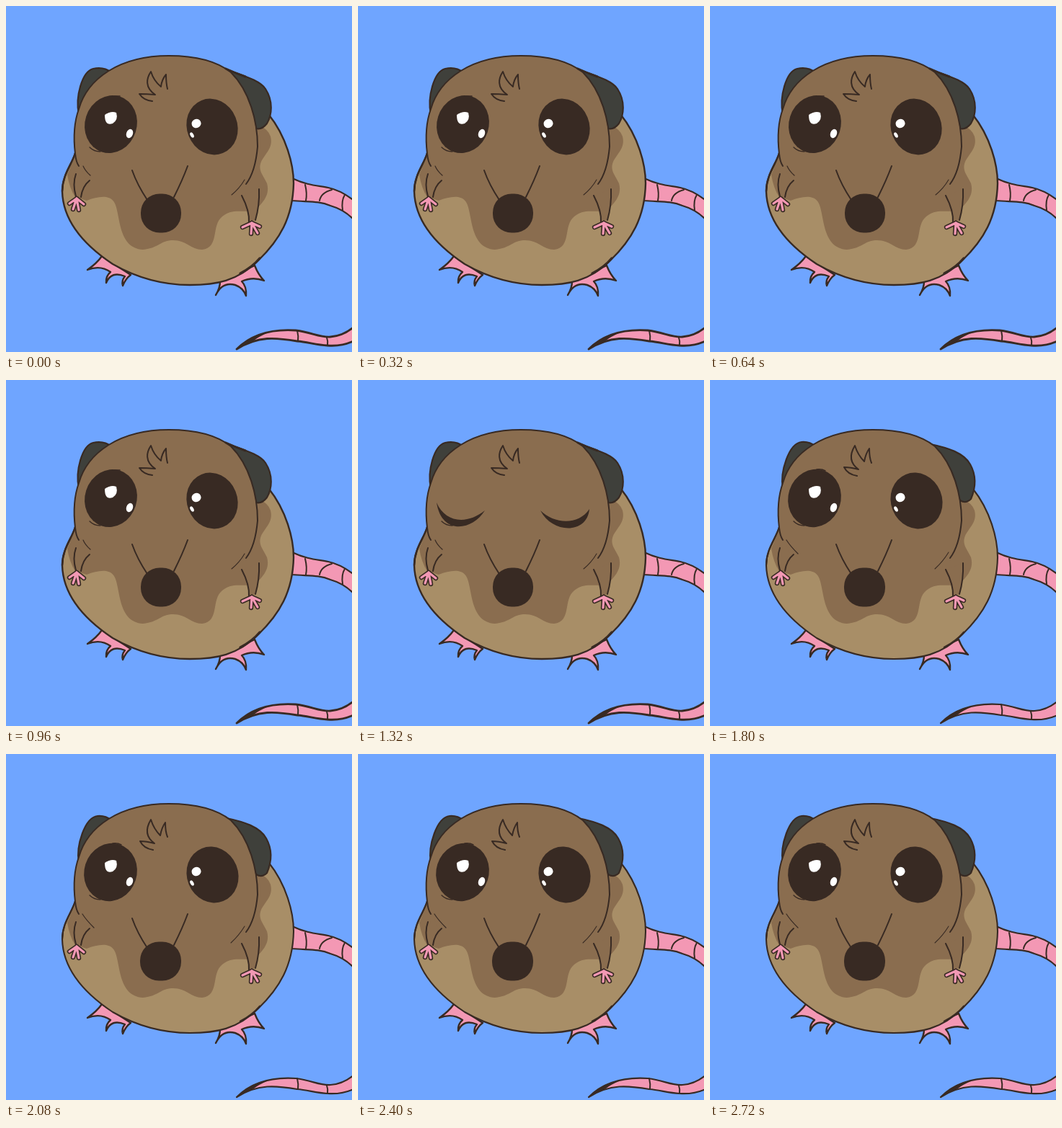
Recreate the animation shown at these times as an HTML page. Size 480 by 480 pixels, loop 2880 ms.

```html
<!DOCTYPE html>
<html lang="en">
<head>
<meta charset="utf-8">
<title>Blinking rat</title>
<style>
html, body { margin: 0; width: 100%; height: 100%; overflow: hidden; background: #6fa5ff; }
svg { display: block; width: 100vw; height: 100vh; }
</style>
</head>
<body>
<svg id="stage" viewBox="0 0 480 480" stroke-linecap="round" stroke-linejoin="round"></svg>
<script>
const INK = '#382a23', BROWN = '#8a6d4f', TAN = '#a88e67', PINK = '#f398b4', EAR = '#3f403b';
const stage = document.getElementById('stage');
const LOOP = 2880, BOIL = 160;

const line = (d, w = 2, color = INK) => `<path d="${d}" fill="none" stroke="${color}" stroke-width="${w}"/>`;
const fill = (d, color) => `<path d="${d}" fill="${color}"/>`;
const shape = (d, color, w = 2.2) => `<path d="${d}" fill="${color}" stroke="${INK}" stroke-width="${w}"/>`;
const oval = (x, y, rx, ry, color, turn = 0) =>
  `<ellipse cx="${x}" cy="${y}" rx="${rx}" ry="${ry}" fill="${color}" transform="rotate(${turn} ${x} ${y})"/>`;

// fingers spread from one point, outlined in ink
function paw(x, y, tips) {
  const d = tips.map(tip => `M${x} ${y}L${tip}`).join('');
  return line(d, 6.4, INK) + line(d, 3.2, PINK);
}

// b picks one of two slightly different drawings
function tail(b) {
  return shape('M397 239C418 249 432 249 447 252C461 255 473 262 484 271V298C474 287 464 281 450 277C434 270 418 272 397 270Z', PINK) +
    line('M415 248Q418 260 416 270M452 255Q437 259 435 270M470 262Q465 270 467 283') +
    shape('M320 476C342 454 372 448 402 450C425 453 435 460 450 459C465 458 475 452 484 444V464C472 470 460 472 446 471C430 470 418 466 404 465C375 460 350 457 320 476Z', PINK, b ? 2.2 : 2.8) +
    fill('M320 476Q338 456 364 453Q350 459 344 464Z', INK) +
    line('M404 450Q406 458 405 465M445 460Q447 465 446 471');
}

function feet() {
  return shape('M133 347Q126 357 113 366Q131 359 145 369Q138 375 139 384Q146 367 165 375Q160 381 162 388Q166 378 173 373Z', PINK, 2.4) +
    shape('M297 382Q297 391 291 401Q300 382 318 387Q329 391 333 402Q334 389 327 382Q342 375 358 381Q350 373 345 360Z', PINK, 2.4);
}

function body(b) {
  return shape('M364 150C389 181 399 220 399 246C398 294 379 325 350 353C321 382 291 387 255 387C211 387 176 374 148 358C112 334 79 300 78 257C78 234 92 219 96 204', TAN, b ? 2.1 : 2.4) +
    fill('M97 204L85 234Q88 253 96 265L112 270C128 264 145 261 151 274C159 290 155 336 190 338C212 336 214 325 232 325C250 325 257 338 272 338C297 335 284 305 300 292C318 277 334 292 350 279C365 264 364 254 362 246C357 235 349 228 354 216C360 204 371 197 367 181Q364 171 349 164Z', BROWN) +
    line('M96 204C92 219 78 234 78 257', b ? 2.1 : 2.4) +
    line('M325 371Q342 362 352 350', b ? 2.6 : 3.4);
}

function head(b) {
  const ears = b
    ? 'M101 150C97 128 109 88 127 86Q138 85 146 92L160 130ZM306 89C330 94 352 101 361 117C371 135 368 151 362 165Q355 172 347 167L320 120Z'
    : 'M101 150C96 127 105 91 121 87Q136 84 146 92L160 130ZM306 88C330 97 352 103 360 115C371 132 369 151 362 163Q355 172 347 170L320 120Z';
  return shape(ears, EAR) +
    fill('M96 205C94 188 93 165 101 143C113 101 157 69 226 69C265 69 293 77 312 92C338 118 349 160 349 203L330 250H115Z', BROWN) +
    line('M101 222Q97 216 96 205C94 188 93 165 101 143C113 101 157 69 226 69C265 69 293 77 312 92C338 118 349 160 349 195Q346 230 333 247') +
    (b ? '' : line('M305 87Q318 93 332 98', 3)) +
    line(b ? 'M331 239Q323 252 312 262' : 'M331 241Q324 253 313 262', 1.1) +
    line(b
      ? 'M204 133Q191 131 186 121Q195 121 206 124C192 114 195 101 201 91Q205 104 214 113Q216 102 221 95Q221 108 224 115'
      : 'M203 132Q191 131 185 122Q195 122 207 123C192 113 195 100 201 91Q205 104 215 112Q216 102 222 95Q222 107 224 115');
}

function arms(b) {
  return line('M97 233Q92 247 97 264M116 242Q106 250 104 265') +
    line(b ? 'M106 222Q111 230 122 241' : 'M107 222Q110 229 117 235', 1.2) +
    fill('M327 263Q338 284 337 300L346 297Q352 276 351 254Z', BROWN) +
    line('M327 263Q338 284 337 300M351 254Q352 276 346 297') +
    paw(98, 267, ['88 274', '93 282', '101 283', '108 275']) +
    paw(341, 301, ['328 307', '340 316', '349 315', '352 306']);
}

function snout(b) {
  return line('M175 228Q182 248 196 269M252 222Q245 241 233 265') +
    `<rect x="${187 - b}" y="260.5" width="${56 + b}" height="54" rx="26" fill="${INK}"/>`;
}

// lid: 0 open, 1 lowered, 2 half shut, 3 shut
function eyes(b, lid) {
  const crease = line('M116 196Q122 202 131 202', 1.3);
  if (lid === 3) return crease + fill(
    'M109 170C121 198 151 201 176 181C159 209 116 216 109 170ZM253 181C272 200 306 202 321 179C318 214 270 214 253 181Z', INK);
  const balls = oval(145.5 - b * .5, 164, 36 + b * .5, 40.5, INK, 18) +
    oval(286 + b * .5, 167.5, 35 + b * .5, 39.5, INK, -22) +
    fill('M137 151Q146 145 153 148Q156 158 148 163Q137 167 137 151Z', '#fff') +
    oval(171.5, 177, 4.5, 6.4, '#fff', 20) +
    oval(264, 163, 6.6, 6.2, '#fff', -25) + oval(258, 179, 2.3, 4, '#fff', -28);
  if (!lid) return balls + crease + line(b
    ? 'M148 124Q155 123 160 126M276 133Q288 126 302 138' : 'M150 125L158 125M285 130Q294 131 301 139', 1.5);
  return `<clipPath id="lid"><path transform="translate(0 ${lid === 1 ? -25 : 0})"
    d="M100 161Q146 179 190 164L245 167Q285 179 330 172V240H100Z"/></clipPath>
    <g clip-path="url(#lid)">${balls}</g>` + crease;
}

const LIDS = [[1080, 0], [1200, 1], [1320, 2], [1560, 3], [1680, 2], [1800, 1], [LOOP, 0]];
let shown = '';

function frame(now) {
  const t = now % LOOP;
  const b = Math.floor(t / BOIL) % 2;
  const lid = LIDS.find(([end]) => t < end)[1];
  if (shown !== b + '/' + lid) {
    shown = b + '/' + lid;
    stage.innerHTML = tail(b) + feet() + body(b) + head(b) + arms(b) + snout(b) + eyes(b, lid);
  }
  requestAnimationFrame(frame);
}
frame(performance.now());
</script>
</body>
</html>
```
